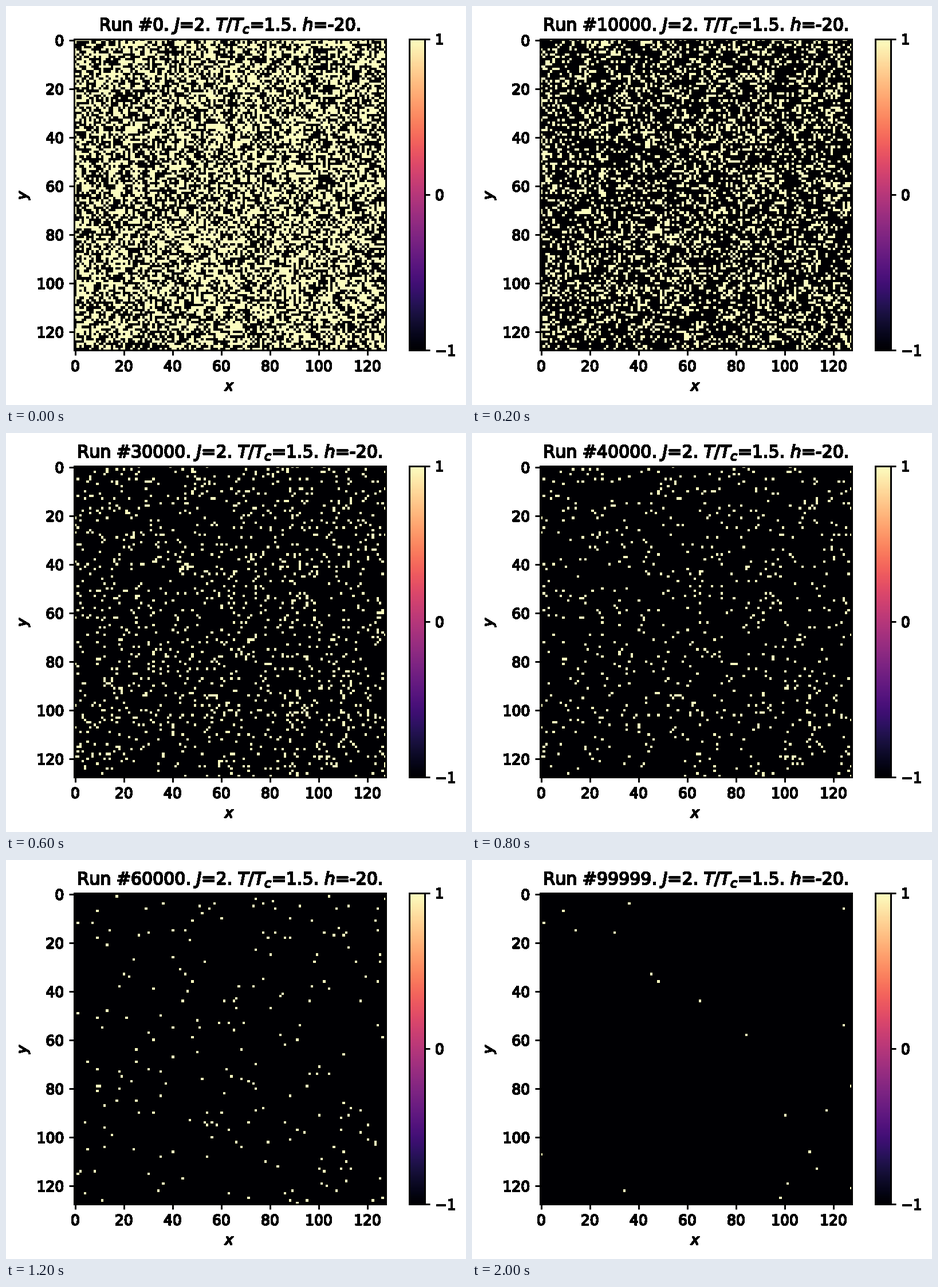
Recreate the animation shown at these times as a matplotlib script. Size 803 px wide and 698 px high, loop 2.1 s.

```python
import numpy as np
import matplotlib.pyplot as plt
from matplotlib.animation import FuncAnimation
from matplotlib.patheffects import withStroke

W, H, DPI = 803, 698, 180
N = 128                      # lattice side
FRAMES, STEP = 21, 5000      # one picture every STEP runs
LAST = (FRAMES - 1) * STEP - 1
FLIP_UP = 3e-4               # chance that a visited spin ends against the field

plt.rcParams.update({
    "axes.linewidth": 1.2,
    "xtick.major.width": 1.2,
    "ytick.major.width": 1.2,
    "text.antialiased": False,
})


def simulate():
    """Lattice snapshots: each run visits one random site and aligns it."""
    rng = np.random.default_rng(7)
    spins = rng.choice([-1, 1], N * N)
    shots = [spins.reshape(N, N).copy()]
    for _ in range(FRAMES - 1):
        sites = rng.integers(N * N, size=STEP)
        spins[sites] = np.where(rng.random(STEP) < FLIP_UP, 1, -1)
        shots.append(spins.reshape(N, N).copy())
    return shots


def add_axes(left, top, width, height):
    return fig.add_axes([left / W, 1 - (top + height) / H,
                         width / W, height / H])


def embolden(*texts):
    for text in texts:
        text.set_path_effects([withStroke(linewidth=0.4, foreground="black")])


shots = simulate()

fig = plt.figure(figsize=(W / DPI, H / DPI), dpi=DPI, facecolor="white")
ax = add_axes(118.7, 57.9, 544.2, 544.2)
cax = add_axes(704.2, 57.9, 27.2, 544.2)

image = ax.imshow(shots[0], cmap="magma", vmin=-1, vmax=1,
                  interpolation="nearest")
ax.set_xticks(range(0, N, 20))
ax.set_yticks(range(0, N, 20))
ax.set_xlabel("$x$")
ax.set_ylabel("$y$")
title = ax.set_title("")
fig.colorbar(image, cax=cax, ticks=[-1, 0, 1])
embolden(title, ax.xaxis.label, ax.yaxis.label, *ax.get_xticklabels(),
         *ax.get_yticklabels(), *cax.get_yticklabels())


def draw(i):
    run = min(i * STEP, LAST)
    image.set_data(shots[i])
    title.set_text(f"Run #{run}. $J$=2. $T/T_c$=1.5. $h$=-20.")
    return image, title


anim = FuncAnimation(fig, draw, frames=FRAMES, interval=100, repeat=True,
                     repeat_delay=0, blit=False)
plt.show()
```
